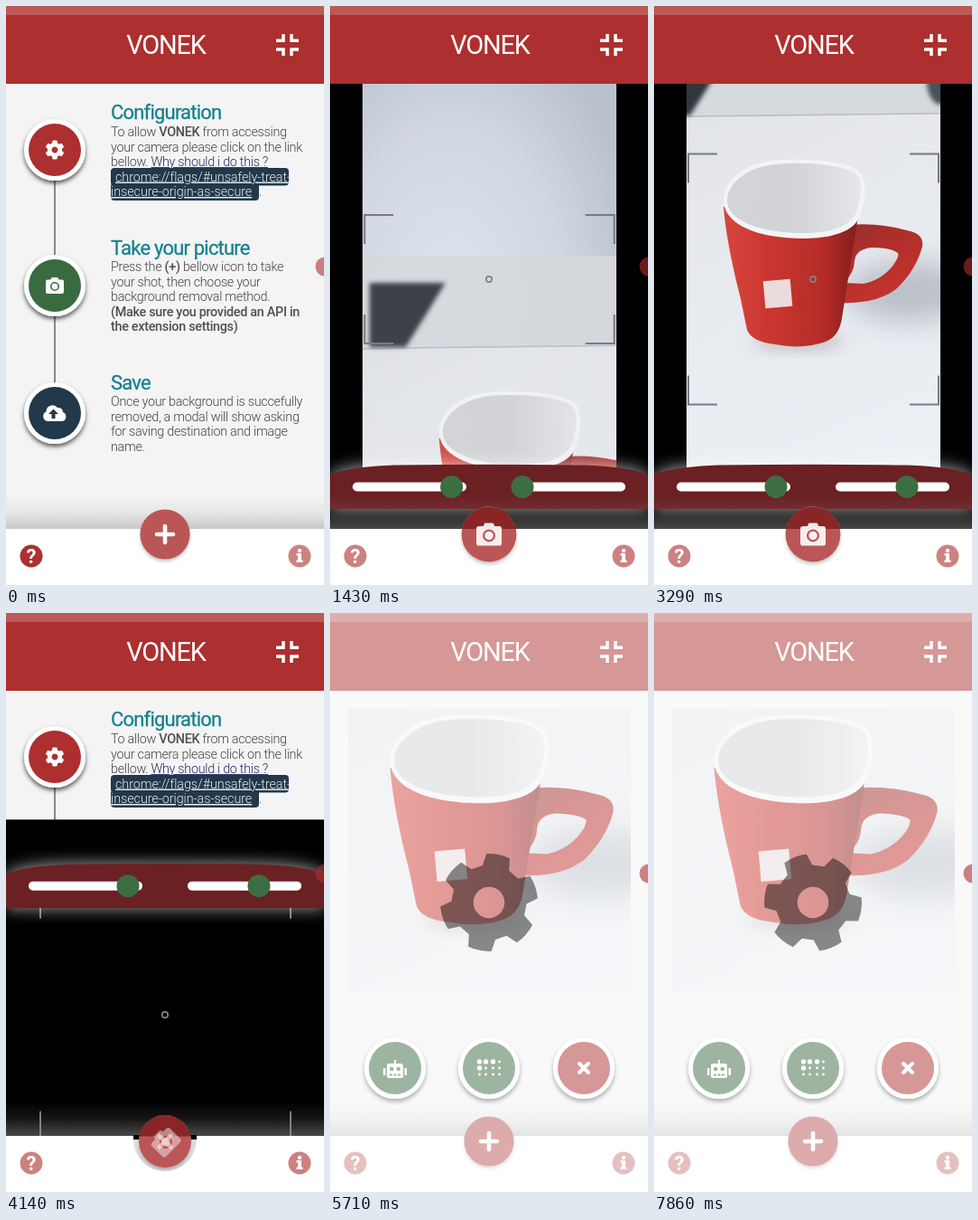
Animation, 352 px wide and 640 px high, one loop 8 s. Source, as an HTML page:

```html
<!DOCTYPE html>
<html lang="en">
<head>
<meta charset="utf-8">
<title>Background remover</title>
<style>
  html, body { margin: 0; height: 100%; overflow: hidden; background: #f4f4f4; }
  svg { display: block; width: 100vw; height: 100vh; font-family: Roboto, Arial, sans-serif; }
  .h { font-size: 22px; letter-spacing: -.8px; fill: #15808f; stroke: #15808f; stroke-width: .3; }
  .p { font-size: 14.4px; font-weight: 300; letter-spacing: -.31px; fill: #444; }
  .b { font-weight: 500; fill: #505050; }
  .link { fill: #2b2a66; text-decoration: underline; }
  .code { fill: #e6eef2; letter-spacing: -.08px; text-decoration: underline; }
</style>
</head>
<body>
<svg id="stage" viewBox="0 0 352 640"></svg>
<script>
const RED = '#ad2f2f', GREEN = '#3a6b40', NAVY = '#22384b';
const $ = id => document.getElementById(id);

function gear(R) {
  let d = '';
  for (let k = 0; k < 6; k++)
    for (const [off, r] of [[-21, .77], [-14, 1], [14, 1], [21, .77]]) {
      const a = (k * 60 + off) * Math.PI / 180;
      const p = `${(R * r * Math.cos(a)).toFixed(2)} ${(R * r * Math.sin(a)).toFixed(2)}`;
      d += !d ? 'M' + p : off === 14 ? `A${R} ${R} 0 0 1 ${p}` : 'L' + p;
    }
  const h = R * .32;
  return d + `ZM${h} 0A${h} ${h} 0 1 0 ${-h} 0A${h} ${h} 0 1 0 ${h} 0Z`;
}

const icon = {
  gear: `<path d="${gear(10.5)}" fill-rule="evenodd" transform="rotate(30)"/>`,
  camera: `<path fill-rule="evenodd" d="M-8-6.500H-4.500L-3.300-9H3.300L4.500-6.500H8Q10-6.500 10-4.500V7Q10 9 8 9H-8Q-10 9-10 7V-4.500Q-10-6.500-8-6.500ZM5 1A5 5 0 1 0-5 1A5 5 0 1 0 5 1Z"/><circle cy="1" r="3.400"/>`,
  cloud: `<path fill-rule="evenodd" d="M-8 9A5.500 5.500 0 0 1-9.500-1.500A7 7 0 0 1 3-6A5 5 0 0 1 9-1A5.200 5.200 0 0 1 8 9ZM-1.500-4.500L-7 1H-3.500V6H.5V1H4Z"/>`,
  robot: `<path fill-rule="evenodd" d="M-1-9H1V-5H6Q9-5 9-3V9Q9 11 7 11H-7Q-9 11-9 9V-3Q-9-5-6-5H-1ZM-6 1a2.300 2.300 0 1 0 4.600 0a2.300 2.300 0 1 0-4.600 0ZM1.400 1a2.300 2.300 0 1 0 4.600 0a2.300 2.300 0 1 0-4.600 0ZM-6 6.500V8.500H-3V6.500ZM-1.500 6.500V8.500H1.500V6.500ZM3 6.500V8.500H6V6.500Z"/><path d="M-13 0h2.500V8H-13ZM10.500 0H13V8H10.500Z"/>`,
  dots: [0, 1, 2].map(r => [-10.500, -3.500, 4.500, 11.500].map((x, c) =>
    `<circle cx="${x}" cy="${r * 7 - 7}" r="${(r === 0 && c < 3) || (r === 1 && c === 0) ? 2.700 : 1.400}"/>`).join('')).join(''),
  cross: `<path d="M-5-5L5 5M5-5L-5 5" stroke="#fff" stroke-width="4" stroke-linecap="round"/>`
};

const disc = (x, y, color, name) => `<g transform="translate(${x} ${y})" fill="#fff">
  <circle r="34" filter="url(#drop)"/><circle r="29" fill="${color}"/>${icon[name]}</g>`;
const lines = (y, rows) => rows.map((s, i) =>
  `<text class="p" x="116" y="${y + i * 16.55}">${s}</text>`).join('');
const bold = s => `<tspan class="b">${s}</tspan>`;
const heading = (y, s) => `<text class="h" x="116" y="${y}">${s}</text>`;
const grad = (id, box, ...stops) => `<linearGradient id="${id}" ${box}>` + stops.map(([o, c, a = 1]) =>
  `<stop offset="${o}" stop-color="${c}" stop-opacity="${a}"/>`).join('') + '</linearGradient>';
const track = x => `<rect x="${x}" y="526.500" width="126" height="10" rx="5" fill="#fff"/>`;
const DOWN = 'x1="0" y1="0" x2="0" y2="1"';

const defs = `<defs>
  <filter id="drop" x="-40%" y="-40%" width="180%" height="180%">
    <feDropShadow dx="0" dy="3" stdDeviation="2.500" flood-opacity=".65"/></filter>
  <filter id="soft" x="-50%" y="-50%" width="200%" height="200%"><feGaussianBlur stdDeviation="9"/></filter>
  <filter id="wide" x="-50%" y="-50%" width="200%" height="200%"><feGaussianBlur stdDeviation="16"/></filter>
  <filter id="blur" x="-50%" y="-50%" width="200%" height="200%"><feGaussianBlur stdDeviation="2.500"/></filter>
  ${grad('shade', DOWN, [0, '#999', 0], [.5, '#999', .14], [1, '#999', .48])}
  ${grad('table', 'x1="0" y1="0" x2=".4" y2="1"', [0, '#d9dce1'], [.35, '#e6e8ec'], [1, '#edf2f7'])}
  ${grad('body', '', [0, '#d5473e'], [.3, '#cc3831'], [.75, '#b42b27'], [1, '#801d1c'])}
  ${grad('inside', '', [0, '#d3d4d8'], [.5, '#d2d3d7'], [1, '#e6e7ea'])}
  ${grad('handle', 'x1="0" y1="0" x2=".5" y2="1"', [0, '#8f3330'], [.35, '#ad2e2a'], [1, '#c6332d'])}
  <radialGradient id="wall" cx=".35" cy=".55" r=".75">
    <stop offset="0" stop-color="#dde3ed"/><stop offset=".55" stop-color="#d3d9e3"/><stop offset="1" stop-color="#b9c1cc"/></radialGradient>
  <clipPath id="view"><rect x="36" y="86" width="281" height="430"/></clipPath>
  <clipPath id="sheet"><rect y="86" width="352" height="492"/></clipPath>
  <clipPath id="photo"><rect x="20" y="106" width="313" height="313"/></clipPath>
  <g id="scene">
    <rect x="-60" y="20" width="520" height="620" fill="url(#table)"/>
    <path d="M-60 20H460V118L40 122L-60 124Z" fill="#d6d9dd"/>
    <path d="M-60 124L40 122L460 117" stroke="#b9bcc1" stroke-width="1.500" fill="none"/>
    <path d="M0 50H84L62 86L40 121H0Z" fill="#31363b" filter="url(#blur)"/>
    <path d="M302 70H345V112L312 108Q303 100 302 86Z" fill="#47525a" filter="url(#blur)"/>
    <ellipse cx="282" cy="316" rx="70" ry="34" fill="#9ba3ae" opacity=".6" filter="url(#wide)"/>
    <ellipse cx="160" cy="370" rx="50" ry="10" fill="#a99a9f" opacity=".6" filter="url(#soft)"/>
    <path fill="url(#handle)" fill-rule="evenodd" d="M216 242Q250 239 284 249Q299 253 297 266Q290 292 268 313Q245 330 206 328ZM222 281Q224 269 240 267Q262 267 270 273Q272 278 262 290Q250 303 232 307L210 306Q222 295 222 281Z"/>
    <path fill="url(#body)" d="M77 222Q80 262 96 324L103 358Q108 371 134 374Q165 380 190 371Q205 365 208 345L226 232Z"/>
    <path fill="#f3f4f6" d="M77 214C78 192 100 171 145 170C175 169 212 172 226 182C237 190 235 215 227 234C220 250 195 257 165 257C125 257 77 246 77 214Z"/>
    <path fill="url(#inside)" d="M81 213C83 195 104 175 146 174C175 173 209 176 223 185C232 192 230 213 223 230C215 245 193 251 165 251C128 251 79 241 81 213Z"/>
    <rect x="122" y="303" width="30" height="30" fill="#eadcdc" transform="rotate(-5 137 318)"/>
  </g></defs>`;

const home = `<rect width="352" height="640" fill="#f4f4f4"/>
  <path d="M54 190V430" stroke="#666" stroke-width="1.500"/>
  ${disc(54, 159, RED, 'gear')}${disc(54, 309, GREEN, 'camera')}${disc(54, 450, NAVY, 'cloud')}
  ${heading(125, 'Configuration')}
  ${lines(144, [`To allow ${bold('VONEK')} from accessing`, 'your camera please click on the link',
    'bellow. <tspan class="link">Why should i do this ?</tspan>'])}
  <rect x="116" y="179" width="197" height="19.500" rx="4" fill="${NAVY}"/>
  <rect x="116" y="195.500" width="164" height="19.500" rx="4" fill="${NAVY}"/>
  <text class="p code" x="121" y="193.500">chrome://flags/#unsafely-treat-</text>
  <text class="p code" x="116" y="210">insecure-origin-as-secure</text><text class="p" x="280" y="210">.</text>
  ${heading(275, 'Take your picture')}
  ${lines(293, [`Press the ${bold('(+)')} bellow icon to take`, 'your shot, then choose your',
    'background removal method.', bold('(Make sure you provided an API in'), bold('the extension settings)')])}
  ${heading(424, 'Save')}
  ${lines(442, ['Once your background is succefully', 'removed, a modal will show asking',
    'for saving destination and image', 'name.'])}`;

const modal = `<g id="modal"><rect y="86" width="352" height="492" fill="#f4f4f4"/>
  <g clip-path="url(#photo)"><use href="#scene" transform="translate(20 106) scale(1.122) translate(-35.500 -164)"/></g>
  ${disc(72, 503, GREEN, 'robot')}${disc(176, 503, GREEN, 'dots')}${disc(281, 503, RED, 'cross')}</g>`;

const camera = `<g id="camera" clip-path="url(#sheet)"><rect y="86" width="352" height="492"/>
  <g id="video" clip-path="url(#view)"><rect x="36" y="86" width="281" height="430" fill="url(#wall)"/>
    <use id="pan" href="#scene"/></g>
  <path id="frame" fill="none" stroke="#777b82" stroke-width="2"/>
  <circle cx="176" cy="302" r="3.200" fill="none" stroke="#808288" stroke-width="1.700"/>
  <g id="panel"><path d="M0 520Q10 507 90 507H262Q342 507 352 520V556H0Z" fill="#fff" opacity=".65" filter="url(#soft)"/>
    <path d="M0 519Q14 510 70 507.500Q176 506 282 507.500Q338 510 352 519V556H0Z" fill="#6b2023"/>
    ${track(25)}${track(201)}
    <circle id="knobW" cy="531.500" r="12.500" fill="#3d6e43"/><circle id="knobH" cy="531.500" r="12.500" fill="#3d6e43"/></g></g>`;

const chrome = `<rect y="540" width="352" height="38" fill="url(#shade)"/>
  <rect y="578" width="352" height="62" fill="#fff"/>
  <g id="notch"><path d="M141 582A35 35 0 0 0 211 582Z" fill="#dedede"/><rect x="141" y="577" width="70" height="5"/></g>
  <g id="button">
    <circle cx="176" cy="587" r="30" opacity=".3" filter="url(#blur)"/>
    <circle cx="176" cy="584" r="31" fill="#f4f4f4"/>
    <path id="underDark" d="M145.600 578A31 31 0 0 1 206.400 578Z"/>
    <circle cx="176" cy="584" r="31" fill="${RED}" fill-opacity=".8"/></g>
  <path id="plus" d="M167 584H185M176 575V593" stroke="#fff" stroke-width="4.600" stroke-linecap="round"/>
  <g id="shot" fill="#fff">${icon.camera}</g>
  <g id="help"><circle cx="28" cy="608" r="12.500" fill="${RED}"/>
    <text x="28" y="616" font-size="22" font-weight="700" text-anchor="middle" fill="#fff">?</text></g>
  <g opacity=".6"><circle cx="325" cy="608" r="12.500" fill="${RED}"/>
    <path d="M321.500 605H327V612.500H328.500V615H321.500V612.500H323V607.500H321.500Z" fill="#fff"/><circle cx="325" cy="602" r="2.200" fill="#fff"/></g>
  <rect width="352" height="86" fill="${RED}"/><rect width="352" height="10" fill="#bd5a58"/>
  <text x="177" y="53" font-size="29" letter-spacing="-1.200" text-anchor="middle" fill="#fff">VONEK</text>
  <path d="M299 38.200H307V31M324 38.200H316V31M299 48H307V55M324 48H316V55" fill="none" stroke="#fff" stroke-width="3.500"/>`;

const busy = `<g id="busy"><rect width="352" height="640" fill="#fff" opacity=".5"/>
  <path id="spin" d="${gear(54)}" fill-rule="evenodd" opacity=".45"/></g>`;
const tab = `<circle cx="353" cy="288" r="10.500" fill="${RED}" opacity=".6"/>`;

$('stage').innerHTML = defs + home + modal + camera + chrome + busy + tab;

const set = (id, attrs) => { for (const k in attrs) $(id).setAttribute(k, attrs[k]); };
const span = (t, a, b) => Math.min(1, Math.max(0, (t - a) / (b - a)));
const smooth = p => p * p * (3 - 2 * p);
const mix = (a, b, p) => a + (b - a) * p;
const show = (id, on) => set(id, { visibility: on ? 'visible' : 'hidden' });

function draw(t) {
  const opening = 1 - (1 - span(t, 290, 805)) ** 3;
  const closing = span(t, 3850, 4430) ** 1.8;
  const active = t >= 290 && t < 4430;
  show('camera', active);
  set('camera', { transform: `translate(0 ${492 * (1 - opening + closing)})` });
  set('panel', { transform: `translate(0 ${-492 * span(t, 3710, 4280)})` });
  show('video', active && t < 3850);

  // the camera pans over to the mug, then tilts slightly
  const enter = smooth(span(t, 1290, 1900)), tilt = smooth(span(t, 2140, 3290)), settle = span(t, 3290, 3700);
  set('pan', {
    transform: `translate(${mix(50, 4, enter) - 4 * tilt + 1.5 * settle} ${mix(300, -24, enter) + 24 * tilt - 2 * settle})`,
    opacity: span(t, 1200, 1450)
  });

  // sliders set the width and height of the crop frame
  const pw = smooth(span(t, 950, 1450)), ph = smooth(span(t, 1500, 1980));
  set('knobW', { cx: mix(37, 135, pw) });
  set('knobH', { cx: mix(213, 280, ph) });
  const w = mix(69.5, 138.5, pw), h = mix(71, 138.5, ph);
  let d = '';
  for (const sx of [-1, 1]) for (const sy of [-1, 1])
    d += `M${176.5 + sx * (w - 32)} ${302 + sy * h}h${sx * 32}v${-sy * 32}`;
  set('frame', { d });

  // the main button grows and swaps its icon while the camera is open
  const o = span(t, 290, 600) - span(t, 3950, 4330), size = mix(.89, .98, o);
  set('button', { transform: `translate(176 584) scale(${size}) translate(-176 -584)` });
  set('plus', { opacity: 1 - o, transform: `rotate(${90 * o} 176 584)` });
  set('shot', { opacity: .9 * o, transform: `translate(176 584) rotate(${-90 * (1 - o)}) scale(1.4)` });
  show('underDark', active && t > 400 && closing < .9);
  show('notch', active && (opening < 1 || closing > 0));
  set('notch', { opacity: t < 1000 ? 1 : span(t, 3850, 3950) });
  set('help', { opacity: t < 290 ? 1 : .6 });

  const waiting = t >= 5710;
  show('modal', waiting);
  show('busy', waiting);
  set('spin', { transform: `translate(176 320) rotate(${-79 + (t - 5710) * .18})` });
}

function tick() {
  draw(performance.now() % 8000);
  requestAnimationFrame(tick);
}
tick();
</script>
</body>
</html>
```
